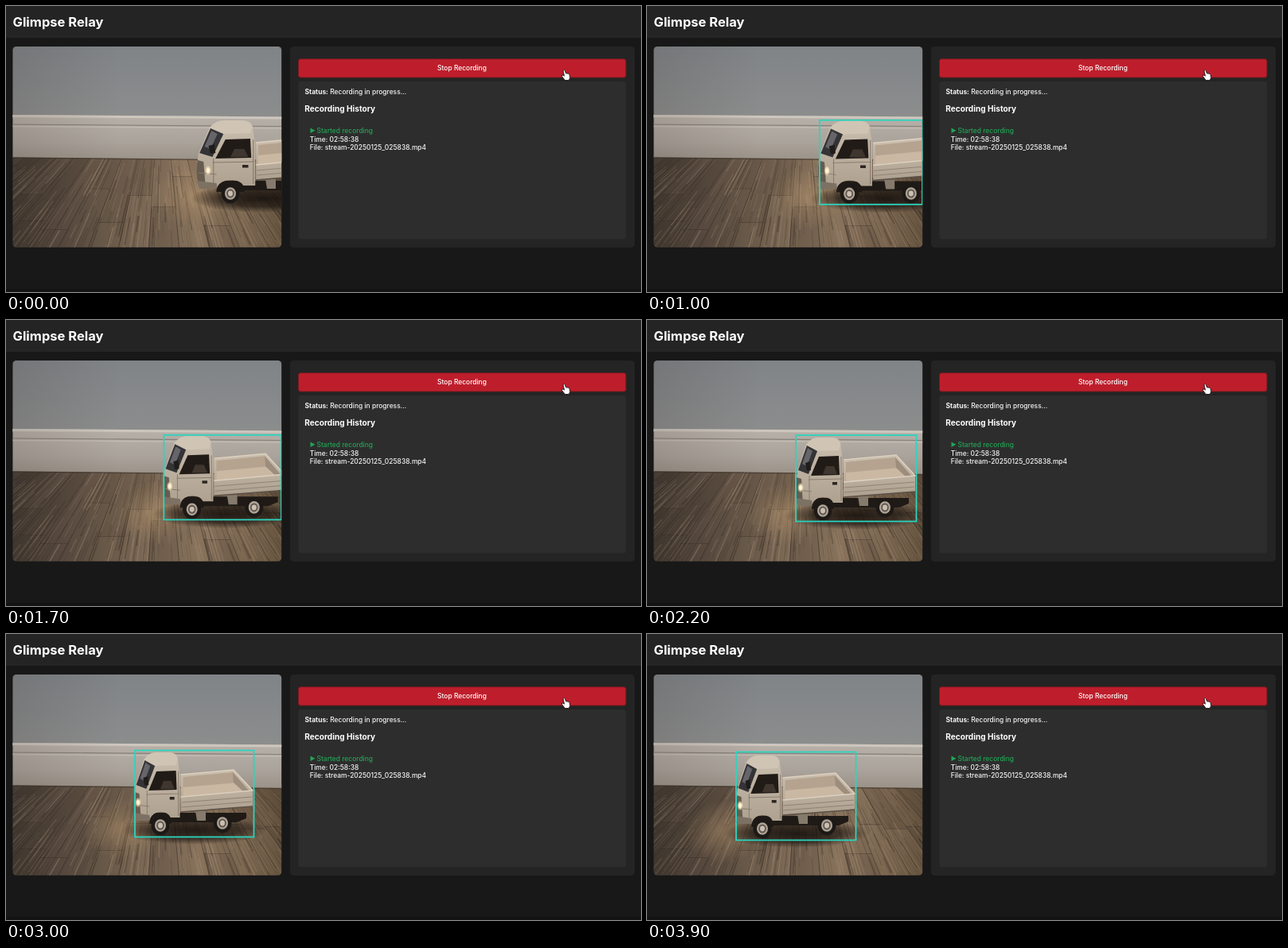
Animation, 798 px wide and 360 px high, one loop 4 s. Source, as an HTML page:

```html
<!DOCTYPE html>
<html lang="en">
<head>
<meta charset="utf-8">
<title>Glimpse Relay</title>
<style>
  html, body { margin: 0; width: 100%; height: 100%; overflow: hidden; background: #181818; }
  svg { display: block; }
  text { font: 500 8.45px Inter, "Liberation Sans", sans-serif; fill: #f5f5f5; }
  .title { font-size: 16.5px; font-weight: 700; fill: #fff; }
  .heading { font-size: 10.1px; font-weight: 700; fill: #fff; }
  .bold { font-weight: 700; }
  .button { text-anchor: middle; fill: #fff; }
  .green { fill: #22a455; }
</style>
</head>
<body>
<svg width="798" height="360" viewBox="0 0 798 360">
  <defs>
    <clipPath id="frame"><rect x="8.5" y="51" width="337.7" height="252.7" rx="4.5"/></clipPath>
    <linearGradient id="wall" x2="0" y2="1">
      <stop stop-color="#808487"/><stop offset="1" stop-color="#8c8d8d"/>
    </linearGradient>
    <linearGradient id="board" x2="0" y2="1">
      <stop stop-color="#b8b1a9"/><stop offset=".6" stop-color="#aaa39b"/><stop offset="1" stop-color="#9b9288"/>
    </linearGradient>
    <linearGradient id="side">
      <stop stop-color="#2a211a" stop-opacity=".14"/><stop offset=".4" stop-color="#2a211a" stop-opacity="0"/>
    </linearGradient>
    <linearGradient id="wood">
      <stop stop-color="#4a4038"/><stop offset=".4" stop-color="#705f4e"/>
      <stop offset=".7" stop-color="#977f66"/><stop offset="1" stop-color="#66543f"/>
    </linearGradient>
    <linearGradient id="cream" x2="0" y2="1">
      <stop stop-color="#cbbfaf"/><stop offset="1" stop-color="#ada08f"/>
    </linearGradient>
    <radialGradient id="warm">
      <stop stop-color="#d3ad7c" stop-opacity=".35"/><stop offset="1" stop-color="#c9a274" stop-opacity="0"/>
    </radialGradient>
    <radialGradient id="lamp">
      <stop stop-color="#fffbe8"/><stop offset=".4" stop-color="#fff0cc"/><stop offset="1" stop-color="#ffe2a8" stop-opacity="0"/>
    </radialGradient>
    <radialGradient id="shade">
      <stop stop-color="#17110d" stop-opacity=".9"/><stop offset=".6" stop-color="#17110d" stop-opacity=".65"/>
      <stop offset="1" stop-color="#17110d" stop-opacity="0"/>
    </radialGradient>
    <g id="wheel">
      <ellipse rx="11.5" ry="12.3" fill="#1d1916"/>
      <ellipse rx="7" ry="7.8" fill="#b0a597"/>
      <ellipse rx="4.8" ry="5.5" fill="#5f574f"/>
      <ellipse rx="3" ry="3.4" fill="#cabfb0"/>
    </g>
  </defs>

  <rect width="798" height="360" fill="#181818"/>
  <rect width="798" height="40" fill="#242424"/>
  <rect y="356" width="798" height="4" fill="#131313"/>
  <text class="title" x="8.5" y="26">Glimpse Relay</text>

  <g clip-path="url(#frame)">
    <rect x="8" y="51" width="339" height="90" fill="url(#wall)"/>
    <g id="floor"><rect x="8" y="188" width="339" height="117" fill="url(#wood)"/></g>
    <path d="M8 137L347 139.500V194L8 190.500Z" fill="url(#board)"/>
    <path d="M8 138.500L347 141" stroke="#cdc6bd" stroke-width="3"/>
    <path d="M8 149L347 151.500" stroke="#85807a" stroke-width="1.2"/>
    <path d="M8 151.500L347 154" stroke="#c2bbb2" stroke-width="1.500"/>
    <path d="M8 191L347 194.500" stroke="#3b322b" stroke-opacity=".6" stroke-width="1.500"/>
    <rect x="8" y="51" width="339" height="254" fill="url(#side)"/>

    <g id="truck">
      <ellipse cx="-48" cy="4" rx="50" ry="40" fill="url(#warm)"/>
      <ellipse cx="42" cy="6" rx="92" ry="18" fill="url(#shade)"/>
      <path d="M-22 -16H108V-9L96 -4H-10Z" fill="#1f1a16"/>
      <path d="M44 -18H57V-6H46Z" fill="#857a6c"/>
      <g id="bed">
        <path d="M26 -64L92 -70L116 -44V-24L26 -17Z" fill="url(#cream)"/>
        <path d="M29 -61L91 -67L111 -44L29 -37Z" fill="#b5a38f"/>
        <path d="M29 -48L96 -54L110 -44L29 -37Z" fill="#cab8a3"/>
        <path d="M91 -67L111 -44L104 -43L92 -54Z" fill="#9d8d7c"/>
        <path d="M26 -64L92 -70L116 -44L26 -36" fill="none" stroke="#ddd1bf" stroke-width="1.500"/>
        <path d="M27 -29L115 -36M27 -23L115 -30" stroke="#8b7f70" stroke-width=".9"/>
        <path d="M26 -17L116 -24" stroke="#5a5047" stroke-width="1.500"/>
      </g>
      <g id="cab">
        <path d="M-32 -51L-21 -83Q-15 -92 -5 -92H13Q20 -91 22 -86L25 -62V-10H13Q10 -17 0 -17T-13 -7H-31Q-35 -20 -34 -34Z" fill="url(#cream)"/>
        <path d="M-21 -83Q-15 -92 -5 -92H13Q20 -91 22 -84L20 -76L-7 -75Z" fill="#d0c5b5"/>
        <path d="M-33 -42L-27 -40L-25 -8L-31 -7Q-35 -20 -34 -34Z" fill="#675c50"/>
        <path d="M-31 -51L-20 -82L-7 -75L-18 -46Z" fill="#343336"/>
        <path d="M-26 -59L-19 -79L-13 -75L-20 -56Z" fill="#65656a"/>
        <path d="M-15 -44L-5 -68L20 -69L21 -45Z" fill="#211b17"/>
        <path d="M0 -46L4 -56H14L18 -46Z" fill="#3f362f"/>
        <path d="M-17 -44V-13M23 -68V-12M-18 -39L24 -40M-32 -26L-14 -24" stroke="#85796a" stroke-width=".9" fill="none"/>
        <path d="M12 -36H18V-32.500H12Z" fill="#2c2521"/>
        <path d="M-22 -60L-16 -62L-15 -51L-20 -50Z" fill="#1f1c1a"/>
        <path d="M-34 -16L-14 -13L-13 -6H-31Z" fill="#7d7163"/>
        <path d="M-14 -2Q-14 -16 0 -16T14 -2Z" fill="#1f1a16"/>
      </g>
      <use href="#wheel"/>
      <use href="#wheel" id="rear"/>
      <ellipse cx="-28" cy="-29" rx="4" ry="6.500" fill="url(#lamp)"/>
    </g>
    <rect id="box" fill="none" stroke="#2bd5bf" stroke-width="1.8"/>
  </g>

  <rect x="357" y="51" width="433" height="253" rx="4.500" fill="#242424"/>
  <rect x="367.500" y="66.700" width="411.500" height="23.300" rx="2.500" fill="#be1e2b" stroke="#741a21"/>
  <text class="button" x="573" y="81.300">Stop Recording</text>
  <rect x="367.500" y="95" width="411.500" height="198.500" rx="3" fill="#2d2d2d"/>
  <text x="375.500" y="111.300"><tspan class="bold">Status:</tspan> Recording in progress...</text>
  <text class="heading" x="375.300" y="133.300">Recording History</text>
  <path class="green" d="M382.500 153.500L388.500 156.700L382.500 160Z"/>
  <text class="green" x="390.500" y="160">Started recording</text>
  <text x="381.700" y="170.600">Time: 02:58:38</text>
  <text x="381.700" y="181.200">File: stream-20250125_025838.mp4</text>
  <path transform="translate(704.300 86.600) scale(1.2) translate(-705.500 -86.500)"
    d="M702 82q1.200 -1.200 2 .4l1 2.600q3.500 -.4 4 1.800l.3 2.700l-1.200 2.700h-4.200l-3.300 -4.300q-.4 -1.700 1.600 -.9l1 .8z"
    fill="#fff" stroke="#241216" stroke-width=".8" stroke-linejoin="round"/>
</svg>
<script>
const $ = id => document.getElementById(id);
const set = (el, attrs) => { for (const k in attrs) el.setAttribute(k, attrs[k]); return el; };
let seed = 7;
const rand = () => (seed = seed * 16807 % 2147483647) / 2147483647;

// Floorboards run towards one vanishing point.
const ray = (x, y) => 195 + (x - 195) * (y - 60) / 244;
function strip(x, width, top, bottom, fill, opacity) {
  const el = document.createElementNS("http://www.w3.org/2000/svg", "path");
  const d = `M${ray(x, top)} ${top}L${ray(x + width, top)} ${top}L${ray(x + width, bottom)} ${bottom}L${ray(x, bottom)} ${bottom}Z`;
  $("floor").append(set(el, { d, fill, "fill-opacity": opacity }));
}
for (let x = -125; x < 500; x += 38) {
  const joint = 205 + rand() * 80;
  strip(x, 38, 188, joint, "#2e261f", rand() * .25);
  strip(x, 38, joint, 305, "#2e261f", rand() * .25);
  strip(x, 38, joint, joint + .8, "#2e251f", .4);
  for (let i = 0; i < 26; i++) {
    const top = 180 + rand() * 105;
    strip(x + rand() * 36, .5 + rand() * 1.8, top, top + 15 + rand() * 45, rand() < .55 ? "#2b221b" : "#b59f86", .1 + rand() * .25);
  }
  strip(x, 1, 188, 305, "#2b231d", .55);
}

// time, wheel x, wheel y, cab stretch, rear wheel dx, rear wheel dy, box left, box top, box bottom
const keys = [
  [0, 282, 236, 1.25, 76, 0, 241, 142, 250],
  [600, 268, 236, 1.18, 77, 0, 229.5, 142.5, 250],
  [1300, 244, 237, 1.13, 78, -1, 207.5, 144.5, 250],
  [2200, 221, 240, 1, 78, -4, 187, 145, 253.5],
  [3000, 194, 241, .98, 78, -3, 162, 146.5, 255.5],
  [3500, 155, 244, .98, 81, -4, 123.5, 148.5, 259.5],
  [3900, 145, 245, .98, 81, -4, 112, 148.5, 259.5]
];

// Cubic through the keys, so that the speed changes smoothly.
function pose(t) {
  const i = Math.max(1, keys.findIndex(k => k[0] >= t));
  const a = keys[i - 1], b = keys[i], span = b[0] - a[0], u = (t - a[0]) / span;
  const before = keys[i - 2] || a, after = keys[i + 1] || b;
  return a.map((v, j) => {
    const d = b[j] - v;
    const m = (b[j] - before[j]) / (b[0] - before[0]) * span;
    const n = (after[j] - v) / (after[0] - a[0]) * span;
    return v + d * u * u * (3 - 2 * u) + u * (1 - u) * (m * (1 - u) - n * u);
  });
}

function draw() {
  const time = Math.floor(performance.now() % 4000 / 100) * 100;
  const [, x, y, stretch, rearX, rearY, left, top, bottom] = pose(time);
  set($("truck"), { transform: `translate(${x} ${y})` });
  set($("cab"), { transform: `scale(${stretch} 1)` });
  set($("bed"), { transform: `translate(116) scale(${(116 - 25 * stretch) / 91} 1) translate(-116)` });
  set($("rear"), { transform: `translate(${rearX} ${rearY})` });
  set($("box"), {
    x: left, y: top, width: Math.min(346, x + 117.5) - left, height: bottom - top,
    visibility: time < 300 ? "hidden" : "visible"
  });
  requestAnimationFrame(draw);
}
draw();
</script>
</body>
</html>
```
